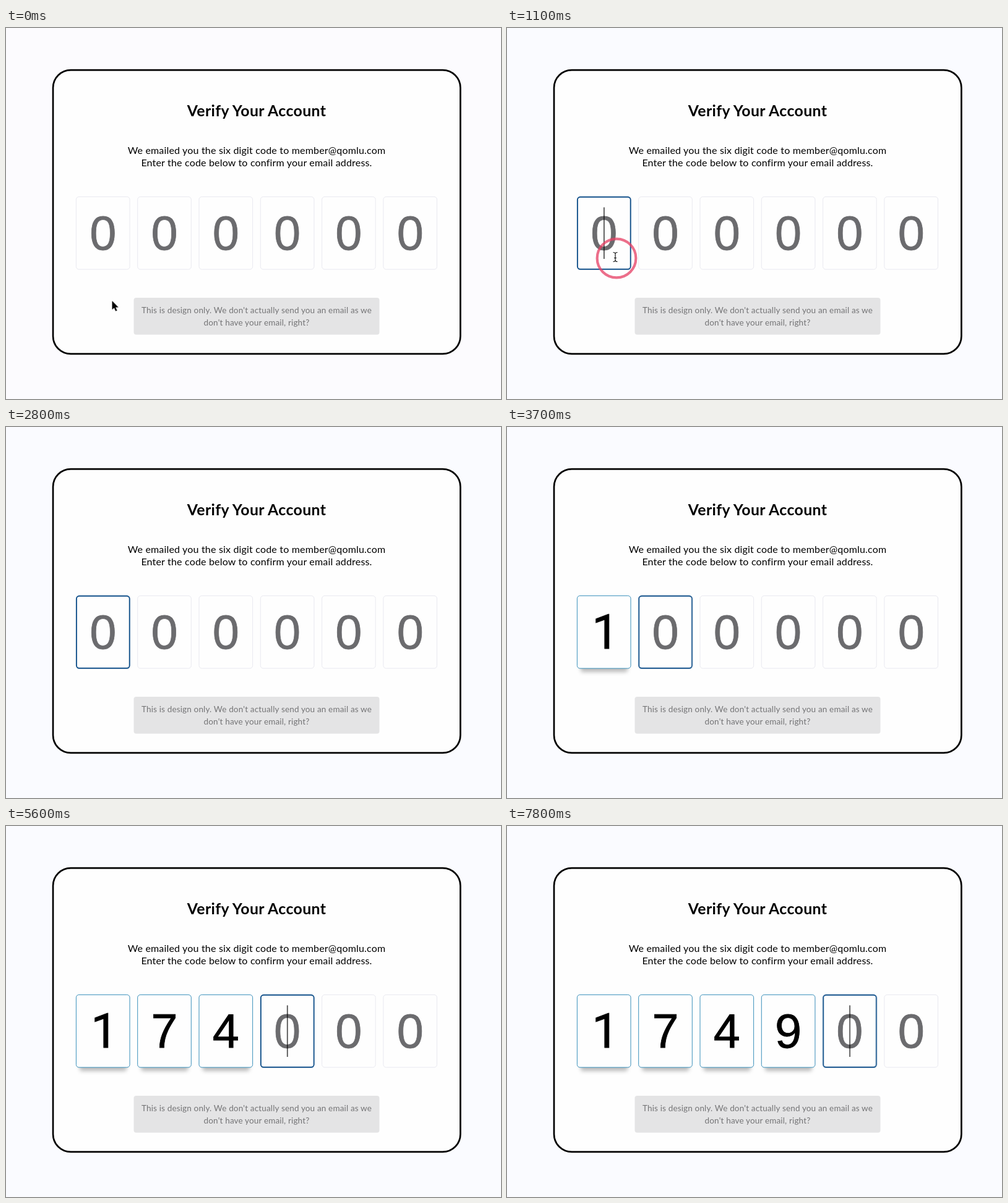
Recreate the animation shown at these times as an HTML page. Size 800 by 601 pixels, loop 8 s.

```html
<!DOCTYPE html>
<html lang="en">
<head>
<meta charset="utf-8">
<title>Verify Your Account</title>
<style>
  html, body { margin: 0; width: 100%; height: 100%; overflow: hidden; background: #fafbff; }
  svg { display: block; width: 100vw; height: 100vh; }
  text { text-anchor: middle; font-family: Lato, "Open Sans", sans-serif; }
  .title { font-size: 24.8px; font-weight: 700; letter-spacing: .38px; }
  .lead { font-size: 16px; letter-spacing: .18px; }
  .note { font-size: 13.5px; letter-spacing: .16px; fill: #747476; }
  .digit { font: 77.5px "Liberation Sans", Arial, sans-serif; stroke-width: .8px; }
  /* a plain 1 without a foot */
  .one { font-family: Roboto, sans-serif; }
  .empty rect { fill: #fefefe; stroke: #e9e9f0; }
  .empty text { fill: #6b6b6e; stroke: #6b6b6e; }
  .filled rect { fill: #fefefe; stroke: #3d93bd; }
  .filled text { stroke: #000; }
  .filled .shade { fill: #000; fill-opacity: .26; stroke: none; filter: blur(3px); }

  .filled, .focus, .caret, .arrow, .beam, .pointer, .ripple, .tint {
    animation: 8s step-end -10ms infinite both;
  }
  .filled { animation-name: var(--fill); }
  .focus { animation-name: focus; }
  .caret { animation-name: blink; }
  .arrow { animation-name: arrow; }
  .beam { animation-name: beam; }
  .tint { animation-name: tint; }
  .pointer { animation-name: move; animation-timing-function: linear; }
  .ripple { animation-name: ripple; animation-timing-function: linear; }

  @keyframes fill0 { 0% { visibility: hidden } 40%, 100% { visibility: visible } }
  @keyframes fill1 { 0% { visibility: hidden } 55%, 100% { visibility: visible } }
  @keyframes fill2 { 0% { visibility: hidden } 70%, 100% { visibility: visible } }
  @keyframes fill3 { 0% { visibility: hidden } 85%, 100% { visibility: visible } }

  @keyframes focus {
    0% { visibility: hidden; transform: none }
    13.75% { visibility: visible; transform: none }
    40% { transform: translateX(99.3px) }
    55% { transform: translateX(198.6px) }
    70% { transform: translateX(297.9px) }
    85%, 100% { visibility: visible; transform: translateX(397.2px) }
  }
  @keyframes blink {
    0%, 20%, 32.5%, 46.25%, 62.5%, 76.25%, 91.25% { opacity: 0 }
    13.75%, 26.25%, 38.75%, 52.5%, 68.75%, 82.5%, 97.5%, 100% { opacity: 1 }
  }
  @keyframes move {
    0%, 1.25% { transform: translate(171.5px, 442px) }
    6.25%, 16.25% { transform: translate(175px, 371px) }
    18.75% { transform: translate(173px, 394px) }
    21.25% { transform: translate(167px, 429px) }
    22.5% { transform: translate(160px, 500px) }
    23.75% { transform: translate(150px, 582px) }
    25%, 100% { transform: translate(147px, 625px) }
  }
  @keyframes arrow {
    0%, 18.5% { visibility: visible }
    5% { visibility: hidden }
    25%, 100% { visibility: hidden }
  }
  @keyframes beam {
    0%, 18.5%, 100% { visibility: hidden }
    5% { visibility: visible }
  }
  @keyframes ripple {
    0%, 13.74% { opacity: 0; r: 28px }
    13.75% { opacity: .8; r: 31px }
    15% { opacity: .35; r: 34px }
    16.25%, 100% { opacity: 0; r: 35px }
  }
  @keyframes tint { 0% { fill: #fcfbfe } 1.25%, 100% { fill: #fafbff } }
</style>
</head>
<body>
<svg viewBox="0 0 800 601">
  <rect class="tint" width="800" height="601"/>
  <rect x="76" y="68.1" width="658.4" height="459.8" rx="28.7" fill="#fefefe" stroke="#000" stroke-width="2.7"/>

  <text class="title" x="405" y="143">Verify Your Account</text>
  <text class="lead" x="405" y="203.5">We emailed you the six digit code to member@qomlu.com</text>
  <text class="lead" x="405" y="223.5">Enter the code below to confirm your email address.</text>

  <g id="cells"></g>
  <g class="focus">
    <rect x="113.9" y="273.8" width="85.8" height="117" rx="4.5" fill="none" stroke="#11508a" stroke-width="1.9"/>
    <rect class="caret" x="156.3" y="290.5" width="1.2" height="83.5"/>
  </g>

  <rect x="206.5" y="437" width="397" height="59.7" rx="4" fill="#e4e4e5"/>
  <text class="note" x="405" y="462">This is design only. We don't actually send you an email as we</text>
  <text class="note" x="405" y="482">don't have your email, right?</text>

  <circle class="ripple" cx="177" cy="373" r="31" fill="none" stroke="#e63f64" stroke-width="4.2"/>
  <g class="pointer">
    <path class="arrow" d="M0 0V14.2L3.3 11.2L5.7 16.7L8 15.7L5.7 10.4H10.2Z" stroke="#fff" stroke-width="1.2" paint-order="stroke"/>
    <path class="beam" d="M-3.5 -7.5Q0 -7.5 0 -5Q0 -7.5 3.5 -7.5M0 -5V5M-3.5 7.5Q0 7.5 0 5Q0 7.5 3.5 7.5M-2 1.5H2" fill="none" stroke="#111" stroke-width="1.2"/>
  </g>
</svg>
<script>
  const code = "1749", pitch = 99.3;
  const shade = '<rect class="shade" x="119" y="380" width="76" height="17" rx="4"/>';
  const cell = (i, kind, digit, under = "") =>
    `<g transform="translate(${i * pitch})"><g class="${kind}" style="--fill:fill${i}">${under}
      <rect x="113.4" y="273.4" width="86.6" height="117.6" rx="4.5"/>
      <text class="digit ${digit === "1" ? "one" : ""}" x="${digit === "1" ? 159 : 156.7}" y="358.5">${digit}</text></g></g>`;
  let html = "";
  for (let i = 0; i < 6; i++) {
    html += cell(i, "empty", "0");
    if (code[i]) html += cell(i, "filled", code[i], shade);
  }
  document.getElementById("cells").innerHTML = html;
</script>
</body>
</html>
```
